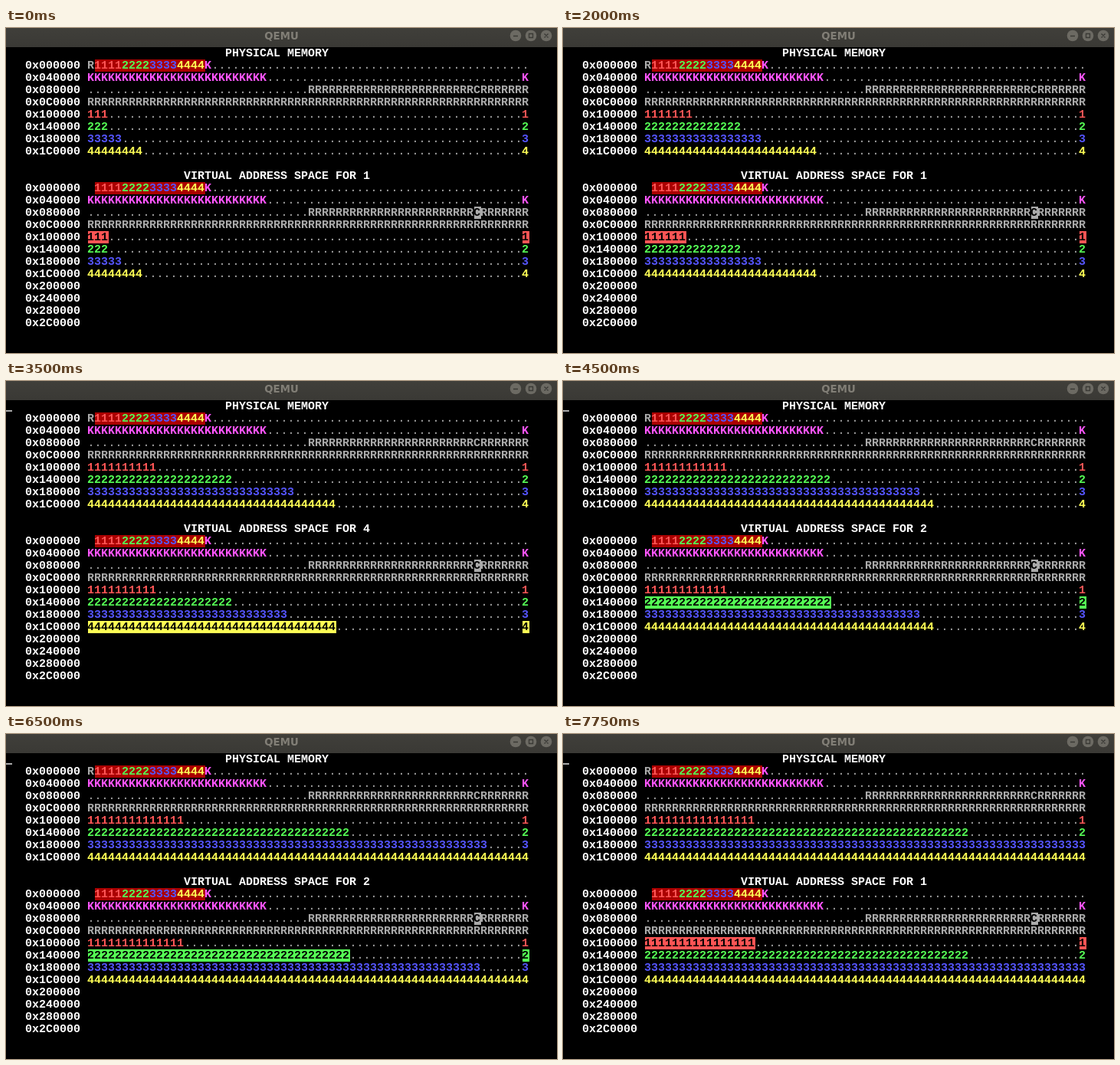
Animation, 719 px wide and 424 px high, one loop 8 s. Source, as an HTML page with a canvas:

```html
<!DOCTYPE html>
<html lang="en">
<head>
<meta charset="utf-8">
<title>QEMU</title>
<style>
  html, body { margin: 0; overflow: hidden; background: #000; }
  canvas { display: block; }
</style>
</head>
<body>
<canvas id="screen" width="719" height="424"></canvas>
<script>
const ctx = document.getElementById('screen').getContext('2d');
const STEP = 250, STEPS = 32;
const CELL_W = 9, CELL_H = 16, LEFT = -1, TOP = 25, MAP_COL = 12, MAP_W = 64;
const GRAY = '#aaa', WHITE = '#fff', MAGENTA = '#f5f', RED_BG = '#a00';
const COLORS = ['#f55', '#5f5', '#55f', '#ff5'];

// Pages owned by each process at the key steps
const KEY_STEPS = [0, 5, 11, 18, 21, 26, 31];
const PAGES = [
  [3.5, 5.5, 8.5, 12.5, 13.5, 14.5, 16.5],
  [3.5, 11.5, 17.5, 27.5, 32.5, 38.5, 47.5],
  [5.5, 12.5, 22.5, 40.5, 46.5, 58.1, 70],
  [8.5, 19.5, 31.5, 42.5, 52.5, 63.5, 70]
];

function pagesOf(process, step) {
  const s = Math.max(0, step), values = PAGES[process];
  let i = 0;
  while (i < KEY_STEPS.length - 2 && s >= KEY_STEPS[i + 1]) i++;
  const f = (s - KEY_STEPS[i]) / (KEY_STEPS[i + 1] - KEY_STEPS[i]);
  return Math.min(MAP_W - 1, Math.floor(values[i] + (values[i + 1] - values[i]) * f));
}

function put(col, row, text, color, bg) {
  const x = LEFT + col * CELL_W, y = TOP + row * CELL_H;
  if (bg) {
    ctx.fillStyle = bg;
    ctx.fillRect(x, y, text.length * CELL_W, CELL_H);
  }
  // Glyphs sit left of the cell centre
  const isDots = text[0] === '.', shift = isDots ? -0.5 : -1;
  ctx.font = (isDots ? '' : 'bold ') + '15px "Liberation Mono", monospace';
  ctx.fillStyle = color;
  [...text].forEach((ch, i) => ctx.fillText(ch, x + shift + i * CELL_W, y + 12));
}

const putMap = (col, row, ...rest) => put(MAP_COL + col, row, ...rest);
const dots = (from, to, row) => putMap(from, row, '.'.repeat(to - from), GRAY);

function drawAddresses(row, count) {
  for (let i = 0; i < count; i++) {
    const hex = (i * 0x40000).toString(16).toUpperCase().padStart(6, '0');
    put(3, row + i, '0x' + hex, WHITE);
  }
}

function drawMap(row, step, active) {
  const isVirtual = active !== undefined;
  if (!isVirtual) putMap(0, row, 'R', GRAY);
  COLORS.forEach((color, p) => putMap(1 + p * 4, row, String(p + 1).repeat(4), color, RED_BG));
  putMap(17, row, 'K', MAGENTA);
  dots(18, MAP_W, row);

  putMap(0, row + 1, 'K'.repeat(26), MAGENTA);
  dots(26, 63, row + 1);
  putMap(63, row + 1, 'K', MAGENTA);

  dots(0, 32, row + 2);
  putMap(32, row + 2, 'R'.repeat(24), GRAY);
  putMap(56, row + 2, 'C', isVirtual ? '#000' : GRAY, isVirtual && GRAY);
  putMap(57, row + 2, 'R'.repeat(7), GRAY);
  putMap(0, row + 3, 'R'.repeat(MAP_W), GRAY);

  COLORS.forEach((color, p) => {
    const digit = String(p + 1), n = pagesOf(p, step), y = row + 4 + p;
    const style = p === active ? ['#000', color] : [color];
    putMap(0, y, digit.repeat(n), ...style);
    dots(n, 63, y);
    putMap(63, y, digit, ...style);
  });
}

function drawTitleBar() {
  const shade = ctx.createLinearGradient(0, 0, 0, TOP);
  shade.addColorStop(0, '#403f3a');
  shade.addColorStop(1, '#3a3935');
  ctx.fillStyle = shade;
  ctx.fillRect(0, 0, 719, TOP);
  ctx.font = 'bold 13.33px "DejaVu Sans", sans-serif';
  ctx.textAlign = 'center';
  ctx.fillStyle = '#817e76';
  ctx.fillText('QEMU', 359.5, 15);
  ctx.textAlign = 'left';

  ctx.fillStyle = '#6c6a63';
  for (const x of [665, 685, 705]) {
    ctx.beginPath();
    ctx.arc(x, 10, 7.3, 0, Math.PI * 2);
    ctx.fill();
  }
  ctx.strokeStyle = '#3a3935';
  ctx.lineWidth = 1.3;
  ctx.stroke(new Path2D('M662 10.5h6 M682.5 7.5h5v5h-5z M702.5 7.5l5 5 M707.5 7.5l-5 5'));
}

function draw(step) {
  const active = Math.floor(step * 0.52 + 0.15) % 4;
  ctx.fillStyle = '#000';
  ctx.fillRect(0, 0, 719, 424);
  drawTitleBar();

  put(32, 0, 'PHYSICAL MEMORY', WHITE);
  drawAddresses(1, 8);
  drawMap(1, step);

  // The lower map is refreshed slightly behind the upper one
  put(26, 10, 'VIRTUAL ADDRESS SPACE FOR ' + (active + 1), WHITE);
  drawAddresses(11, 12);
  drawMap(11, step - 0.1, active);

  // Cursor toggles every 16 ticks of a 60 Hz clock
  if (Math.floor(step * 0.9375 + 0.65) % 2) {
    ctx.fillStyle = GRAY;
    ctx.fillRect(0, 38, 8, 2);
  }
}

const start = performance.now();
function frame() {
  draw(Math.floor((performance.now() - start) / STEP) % STEPS);
  requestAnimationFrame(frame);
}
frame();
</script>
</body>
</html>
```
